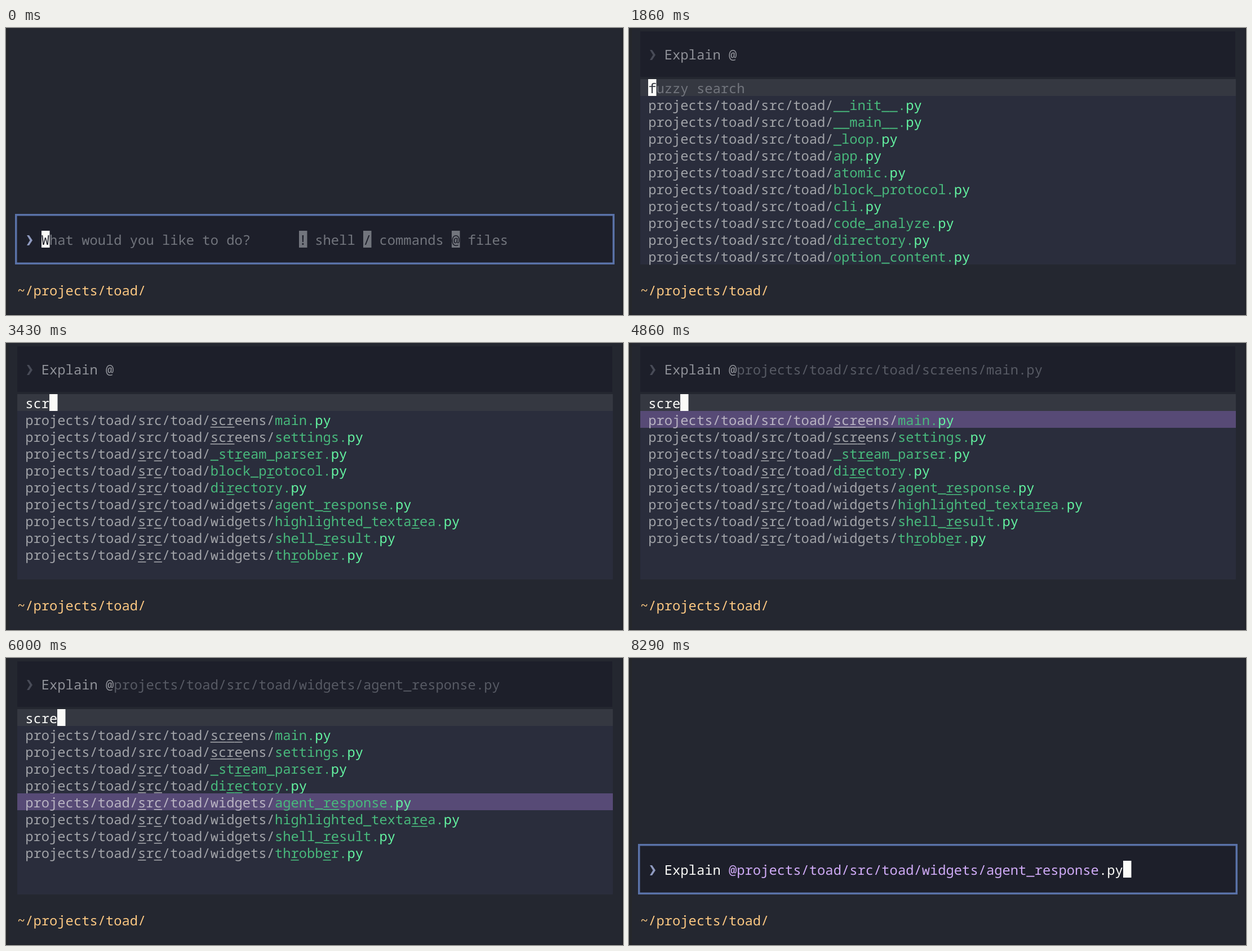
Write an HTML page with a canvas that moves like this. It is 1095 px wide and 511 px high and loops after 8860 ms.

```html
<!DOCTYPE html>
<html lang="en">
<head>
<meta charset="utf-8">
<title>Fuzzy file picker</title>
<style>
  html, body { margin: 0; width: 100%; height: 100%; overflow: hidden; background: #242730; }
  canvas { display: block; }
</style>
</head>
<body>
<canvas id="stage" width="1095" height="511"></canvas>
<script>
const ctx = document.getElementById('stage').getContext('2d');
const LOOP = 8860, TICKS_PER_MS = 7 / 1000, BLINK = 3.5;
const X0 = 34.2, CELL = 14.28, ROW = 30;
const DARK = '#1d1f2a', WHITE = '#fbfbf8', HINT = '#72757d';

const ROOT = 'projects/toad/src/toad/';
const files = [
  'screens/main', 'screens/settings', '_stream_parser',
  '__init__', '__main__', '_loop', 'app', 'atomic', 'block_protocol',
  'cli', 'code_analyze', 'directory', 'option_content',
  'widgets/agent_response', 'widgets/highlighted_textarea',
  'widgets/shell_result', 'widgets/throbber'
].map(name => ROOT + name + '.py');

// Ticks at which keys are pressed
const OPEN = 12, CLOSE = 51;
const promptKeys = [1, 2, 3, 4, 5, 6, 7, 8, 11];
const searchKeys = [17, 19, 22, 25];
const downKeys = [31, 36, 38, 40, 42];
const cursorResets = [0, ...promptKeys, OPEN, ...searchKeys, CLOSE];

const pressed = (keys, tick) => keys.filter(k => k <= tick).length;

function cursorOn(tick) {
  const last = cursorResets.filter(k => k <= tick).pop();
  return Math.floor((tick - last) / BLINK) % 2 === 0;
}

// Positions of the query's letters in a path, or null
function match(path, query) {
  const found = [];
  let at = path.includes('screens') ? ROOT.length : path.indexOf('src');
  for (const ch of query) {
    at = path.indexOf(ch, at);
    if (at < 0) return null;
    found.push(at++);
  }
  return found;
}

function search(query) {
  if (query.length < 2) return files.slice(3, 13);
  return files.filter(f => match(f, query)).slice(0, 10);
}

function rect(x, y, w, h, color) {
  ctx.fillStyle = color;
  ctx.fillRect(x, y, w, h);
}

const cellX = col => X0 + col * CELL;

function put(text, col, top, color) {
  ctx.fillStyle = color;
  [...text].forEach((ch, i) => ctx.fillText(ch, cellX(col + i), top + 25));
}

function block(col, top, color) {
  rect(Math.round(cellX(col)), top, 14.5, ROW, color);
}

function chevron(top, color) {
  ctx.fillStyle = color;
  ctx.beginPath();
  [[37, 8], [41, 8], [47, 17], [41, 26], [37, 26], [42.5, 17]]
    .forEach(([x, y]) => ctx.lineTo(x, top + y));
  ctx.fill();
}

function drawPrompt(tick) {
  const top = 361;
  rect(16, 331, 1064, 90, '#5a72a8');
  rect(19.5, 334.5, 1057, 83, DARK);
  chevron(top, '#8f9abf');
  const on = cursorOn(tick);
  if (tick >= CLOSE) {
    const path = '@' + files[13];
    put('Explain ', 2, top, WHITE);
    put(path.slice(0, -3), 10, top, '#d0abf7');
    put('.py', 7 + path.length, top, WHITE);
    if (on) block(10 + path.length, top, WHITE);
    return;
  }
  const typed = 'Explain @'.slice(0, pressed(promptKeys, tick));
  if (on) block(2 + typed.length, top, WHITE);
  if (typed) return put(typed, 2, top, WHITE);
  put('W', 2, top, DARK);
  put('hat would you like to do?', 3, top, HINT);
  for (const [key, label, col] of [['!', 'shell', 34], ['/', 'commands', 42], ['@', 'files', 53]]) {
    block(col, top, HINT);
    put(key, col, top, DARK);
    put(label, col + 2, top, HINT);
  }
}

function drawFile(path, query, top, selected) {
  if (selected) rect(20, top, 1057, ROW, '#574a76');
  const name = path.lastIndexOf('/') + 1, ext = path.length - 2;
  const folder = selected ? '#b8b3c2' : '#a1a3a8', green = '#48b97c';
  put(path.slice(0, name), 0, top, folder);
  put(path.slice(name, ext), name, top, green);
  put(path.slice(ext), ext, top, '#64f5a2');
  for (const i of match(path, query) || [])
    rect(cellX(i), top + 28, CELL, 1.6, i < name ? folder : green);
}

function drawPicker(tick) {
  const query = 'scre'.slice(0, pressed(searchKeys, tick));
  const list = search(query);
  const selected = pressed(downKeys, tick) - 1;

  rect(20, 6, 1056, 81, DARK);
  chevron(31, '#484b57');
  put('Explain @', 2, 31, '#8f9198');
  if (selected >= 0) put(list[selected], 11, 31, '#575a64');

  rect(20, 91, 1057, 330, '#2a2d3c');
  rect(20, 91, 1057, ROW, '#353841');
  const on = cursorOn(tick);
  if (on) block(query.length, 91, WHITE);
  if (query) put(query, 0, 91, WHITE);
  else {
    put('f', 0, 91, on ? '#353841' : HINT);
    put('uzzy search', 1, 91, HINT);
  }
  list.forEach((path, i) => drawFile(path, query, 121 + i * ROW, i === selected));
}

function draw(ms) {
  const tick = Math.floor((ms % LOOP + 5) * TICKS_PER_MS);
  rect(0, 0, 1095, 511, '#242730');
  rect(0, 0, 5, 511, '#25272b');
  rect(1093.5, 0, 1.5, 511, '#1c1e25');
  rect(0, 510, 1095, 1, '#1e2027');
  ctx.font = '23.8px "Noto Sans Mono", "DejaVu Sans Mono", monospace';
  ctx.textRendering = 'geometricPrecision';
  if (tick >= OPEN && tick < CLOSE) drawPicker(tick);
  else drawPrompt(tick);
  put('~/projects/toad/', -1, 451, '#fcc882');
}

const start = performance.now();
function frame() {
  draw(performance.now() - start);
  requestAnimationFrame(frame);
}
frame();
</script>
</body>
</html>
```
